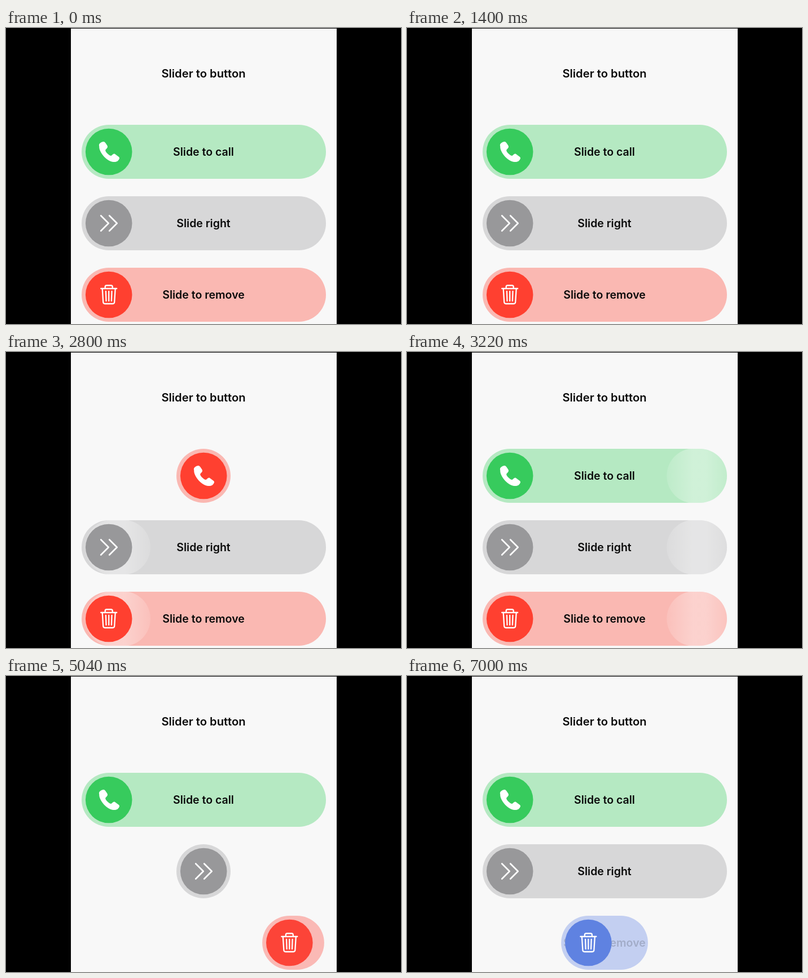
Write an HTML page that moves like this. It is 700 by 526 pixels and loops after 8000 ms.

```html
<!DOCTYPE html>
<html lang="en">
<head>
<meta charset="utf-8">
<title>Slider to button</title>
<style>
  html, body { margin: 0; width: 100%; height: 100%; overflow: hidden; background: #000; }
  svg { display: block; width: 100vw; height: 100vh; }
  text { font: 600 19.5px Inter, sans-serif; text-anchor: middle; fill: #0a0a0a; }
  .title { font-size: 20.2px; }
  .line { fill: none; stroke: #fff; stroke-width: 2.7; stroke-linecap: round; stroke-linejoin: round; }
  .solid { fill: #fff; }
</style>
</head>
<body>
<svg id="stage" viewBox="0 0 700 526">
  <defs>
    <linearGradient id="shine">
      <stop offset="0" stop-color="#fff" stop-opacity=".12"/>
      <stop offset=".4" stop-color="#fff" stop-opacity=".36"/>
      <stop offset=".6" stop-color="#fff" stop-opacity=".36"/>
      <stop offset="1" stop-color="#fff" stop-opacity=".12"/>
    </linearGradient>
  </defs>
  <rect x="115" y="1" width="471" height="525" fill="#f8f8f8"/>
  <text class="title" x="350" y="88">Slider to button</text>
</svg>
<script>
const LOOP = 8000, STEP = 140, LAST = 7000;
const DRAG = 190, MOVE = 420;
const FULL = [134, 567], RELEASED = [457, 567], ROUND = [302, 398];
const GREEN = 'rgb(55 203 93)', GRAY = 'rgb(152 152 154)', RED = 'rgb(255 64 48)', BLUE = 'rgb(0 130 255)';

const icons = {
  phone: '<path class="solid" d="M-17-10C-19-15-12-18-9.5-18C-7-18-6-16-2.5-10.5C-1.5-8-3-6.5-5.5-4C-7-2.5-5 1-1.5 4C1.5 7 4 7.5 5 6.5C7.5 4 9 3 11 4L17 8.5C20 10.5 19 13 16 16C12 19.5 3 19-6 11C-13 4.5-17.5-4-17-10Z"/>',
  chevrons: '<path class="line" d="M-14-13.5L-.5 0L-14 13.5M1-13.5L14.5 0L1 13.5"/>',
  trash: '<path class="line" style="stroke-width:2.3" d="M-14-11H14M-6.5-11V-14Q-6.5-16.5-4-16.5H4Q6.5-16.5 6.5-14V-11M-11.5-11L-10 13Q-9.8 16-7 16H7Q9.8 16 10 13L11.5-11M-5.3-6L-4.7 11M0-6V11M5.3-6L4.7 11"/>',
  check: '<path class="line" d="M-14 1L-4 14L15-14"/>'
};

const sliders = [
  { label: 'Slide to call', y: 220, from: GREEN, to: RED, icon: 'phone', drag: 1680, expand: 2800 },
  { label: 'Slide right', y: 347, from: GRAY, to: GRAY, icon: 'chevrons', drag: 3920, expand: 6160 },
  { label: 'Slide to remove', y: 474, from: RED, to: BLUE, icon: 'trash', doneIcon: 'check', drag: 4780, expand: 6853 }
];

const clamp = v => Math.max(0, Math.min(1, v));
const ease = u => u < 0.5 ? 4 * u ** 3 : 1 - 4 * (1 - u) ** 3;
const progress = (t, start, duration) => ease(clamp((t - start) / duration));
const blend = (a, b, k) => a.map((v, i) => v + (b[i] - v) * k);

const stage = document.getElementById('stage');
sliders.forEach((s, i) => {
  const pill = `y="${s.y - 48}" height="96" rx="48"`;
  stage.insertAdjacentHTML('beforeend', `<g id="slider${i}">
    <clipPath id="clip${i}"><rect class="pill" ${pill}/></clipPath>
    <rect class="pill track" ${pill} fill-opacity=".35"/>
    <g clip-path="url(#clip${i})">
      <text x="350" y="${s.y + 7}">${s.label}</text>
      <rect class="shimmer" y="${s.y - 49}" width="116" height="98" rx="49" fill="url(#shine)"/>
    </g>
    <g class="knob"><circle r="41.3"/><g class="icon"></g></g>
  </g>`);
  const root = document.getElementById('slider' + i);
  const find = name => root.querySelector(name);
  Object.assign(s, {
    pills: root.querySelectorAll('.pill'), track: find('.track'), text: find('text'),
    shimmer: find('.shimmer'), knob: find('.knob'), disc: find('circle'), glyph: find('.icon')
  });
});

// Span of the pill, colour mix, label opacity and icon at time t.
function pose(s, t) {
  if (t >= s.expand) {
    const k = progress(t, s.expand, MOVE);
    return { span: blend(ROUND, FULL, k), mix: 1 - k, opacity: k, done: k === 0 };
  }
  const release = s.drag + DRAG;
  if (t >= release) {
    const k = progress(t, release, MOVE);
    return { span: blend(RELEASED, ROUND, k), mix: k, opacity: 0, done: k > 0.5 };
  }
  const k = progress(t, s.drag, DRAG);
  return { span: blend(FULL, RELEASED, k), mix: 0, opacity: clamp(1 - 2 * k), done: false };
}

function draw(t) {
  const shimmerX = 18 + 549 * ((t - 180) % 2460) / 720;
  for (const s of sliders) {
    const { span: [left, right], mix, opacity, done } = pose(s, t);
    const color = `color-mix(in oklab, ${s.from}, ${s.to} ${(mix * 100).toFixed(1)}%)`;
    for (const p of s.pills) {
      p.setAttribute('x', left);
      p.setAttribute('width', right - left);
    }
    s.track.style.fill = s.disc.style.fill = color;
    s.text.style.opacity = opacity;
    s.shimmer.setAttribute('x', shimmerX);
    s.knob.setAttribute('transform', `translate(${left + 48.2} ${s.y})`);
    const icon = done && s.doneIcon || s.icon;
    if (s.shown !== icon) s.glyph.innerHTML = icons[s.shown = icon];
  }
}

const start = performance.now();
function tick() {
  const t = (performance.now() - start) % LOOP;
  draw(Math.min(LAST, Math.floor(t / STEP) * STEP));
  requestAnimationFrame(tick);
}
tick();
</script>
</body>
</html>
```
